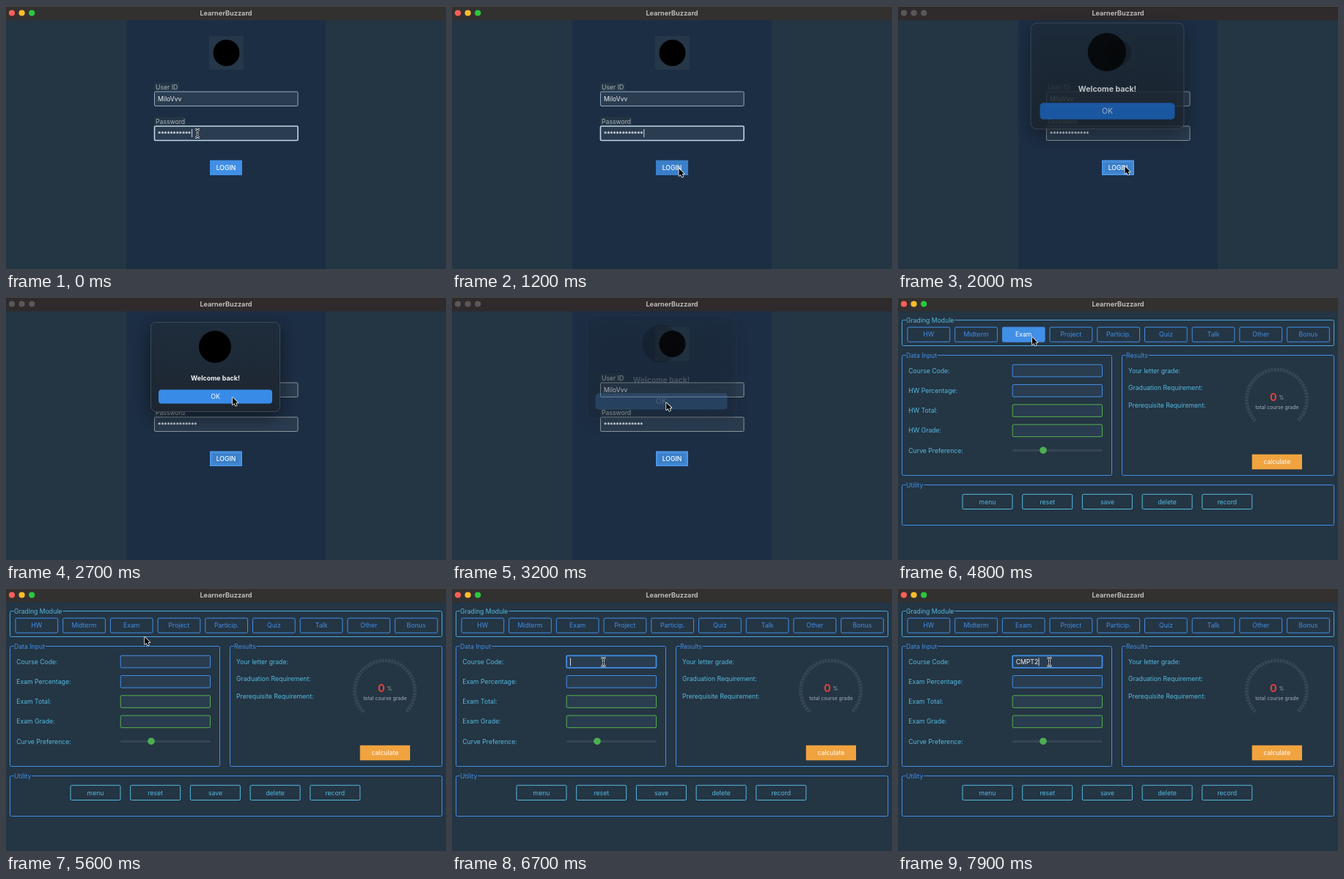
Write an HTML page with a canvas that moves like this. It is 600 px wide and 359 px high and loops after 8000 ms.

```html
<!DOCTYPE html>
<html lang="en">
<head>
<meta charset="utf-8">
<title>LearnerBuzzard</title>
<style>
html, body { margin: 0; overflow: hidden; background: #243544; }
canvas { display: block; width: 600px; height: 359px; }
</style>
</head>
<body>
<canvas width="600" height="359"></canvas>
<script>
const ctx = document.querySelector('canvas').getContext('2d');
const LOOP = 8000;
const BG = '#243544', PANEL = '#1c2e44', ENTRY = '#2a3c50';
const BLUE = '#418fe6', CYAN = '#55bade', GREEN = '#56b04c', ORANGE = '#f0a33e', RED = '#dc413c';

const POPUP_IN = 1850, POPUP_OUT = 3000, MAIN_AT = 3600;
const EXAM_CLICK = 5100, FOCUS_CODE = 6400;

// Pointer keyframes: time, x, y
const PATH = [
  [0, 261, 174], [350, 261, 174], [850, 306, 227], [1200, 309.5, 222], [1500, 309.5, 219],
  [2200, 309.5, 219], [2600, 309, 137], [3050, 309, 137], [3600, 218, 176], [3800, 197, 184],
  [4050, 197, 184], [4600, 181, 52], [4800, 183, 55], [5300, 183, 55], [6200, 206.5, 101]
];
const KEYS = [[7200, 'C'], [7300, 'M'], [7400, 'P'], [7600, 'T'], [7900, '2']];

const clamp = v => Math.max(0, Math.min(1, v));

function pointerAt(t) {
  const i = PATH.findIndex(k => k[0] > t);
  if (i < 0) return PATH[PATH.length - 1].slice(1);
  const [a, b] = [PATH[i - 1], PATH[i]];
  const p = (t - a[0]) / (b[0] - a[0]), e = p * p * (3 - 2 * p);
  return [a[1] + (b[1] - a[1]) * e, a[2] + (b[2] - a[2]) * e];
}

function text(s, x, y, color, { size = 8.67, weight = 400, align = 'left' } = {}) {
  ctx.font = `${weight} ${size}px Inter, sans-serif`;
  ctx.textAlign = align;
  ctx.fillStyle = color;
  ctx.fillText(s, x, y);
}

function box(x, y, w, h, fill, stroke, radius = 0, line = 1) {
  ctx.beginPath();
  ctx.roundRect(x, y, w, h, radius);
  if (fill) { ctx.fillStyle = fill; ctx.fill(); }
  if (stroke) { ctx.strokeStyle = stroke; ctx.lineWidth = line; ctx.stroke(); }
}

function disc(x, y, r, fill) {
  ctx.beginPath();
  ctx.arc(x, y, r, 0, 2 * Math.PI);
  ctx.fillStyle = fill;
  ctx.fill();
}

const inside = ([px, py], x, y, w, h) => px >= x && px <= x + w && py >= y && py <= y + h;

function caret(x, y) {
  ctx.fillStyle = '#d5dce2';
  ctx.fillRect(x, y - 5.5, 1, 11);
}

function titleBar(active) {
  box(0, 0, 600, 19.5, active ? '#333030' : '#2f2b2d');
  box(0, 0, 600, 1, '#4a4747');
  ['#ff5f57', '#febc2e', '#28c840'].forEach((c, i) => disc(8 + i * 13.6, 9.5, 4.1, active ? c : '#5a5758'));
  text('LearnerBuzzard', 300, 12.6, '#bdbab9', { size: 9.1, weight: 700, align: 'center' });
}

function loginPage(t, pointer) {
  const focused = t >= 1400;
  const grey = '#a9b5be';
  box(164, 19.5, 272, 340, PANEL);
  box(277, 41, 47, 46, '#253748');
  disc(300.5, 64, 18, '#000');

  box(202, 104.5, 34, 12, BG);
  text('User ID', 204, 114.2, grey);
  box(202.5, 117, 195.5, 19.5, ENTRY, focused ? '#8b969d' : '#8faabf', 1.5);
  text('MiloVvv', 207, 130.2, '#e8ecef');

  box(202, 151.5, 43, 12, BG);
  text('Password', 204, 161.2, grey);
  box(202.5, 164, 195.5, 19.5, ENTRY, focused ? '#8b969d' : '#bdd7e4', 1.5, focused ? 1 : 1.6);
  const stars = 11 + (t >= 150) + (t >= 300);
  for (let i = 0; i < stars; i++)
    text('*', 209.2 + i * 4.1, 178.3, '#e8ecef', { weight: 600, align: 'center' });
  if (!focused) caret(208 + stars * 4.1, 173.5);

  const hover = inside(pointer, 278, 210, 44, 21);
  box(278, 210.5, 44, 20.5, focused || hover ? '#3a7fc9' : BLUE);
  if (focused) {
    box(279, 211.5, 42, 18.5, null, '#4f9cf0', 0, 1.6);
    ctx.setLineDash([1, 1]);
    box(281.5, 213.5, 37, 14, null, '#6fa9e4', 0, 0.6);
    ctx.setLineDash([]);
  }
  text('LOGIN', 300, 224, '#fff', { weight: 500, align: 'center' });
}

function popup(t) {
  const enter = clamp((t - POPUP_IN) / 400), leave = clamp((t - POPUP_OUT) / 250);
  const alpha = clamp(enter * 2) * (1 - leave);
  if (!alpha) return;
  const scale = 1 + 0.3 * (1 - enter) + 0.2 * leave;
  ctx.save();
  ctx.globalAlpha = alpha;
  ctx.translate(285.5, 95.5);
  ctx.scale(scale, scale);
  ctx.shadowColor = 'rgba(0,0,0,.5)';
  ctx.shadowBlur = 26;
  ctx.shadowOffsetY = 8;
  const fill = ctx.createLinearGradient(0, -61, 0, 61);
  fill.addColorStop(0, '#1e2d3c');
  fill.addColorStop(1, '#1d2630');
  box(-88, -61, 176, 122, fill, null, 7);
  ctx.shadowColor = 'transparent';
  box(-88, -61, 176, 122, null, '#47525d', 7, 0.8);
  disc(-0.5, -27.5, 22, '#000');
  text('Welcome back!', 0, 18.2, '#f2f4f5', { size: 8.9, weight: 700, align: 'center' });
  const lit = t >= 2350;
  box(-77.5, 31, 155, 19, lit ? (t >= 2850 ? '#5aa5f5' : '#388ce8') : '#1a68c4', null, 4);
  text('OK', 0, 43.7, lit ? '#fff' : '#c9d3de', { size: 8.9, align: 'center' });
  ctx.restore();
}

function group(label, x, y, w, h, color, ink = color) {
  box(x, y, w, h, null, color, 2);
  ctx.font = '400 8.67px Inter, sans-serif';
  box(x + 5, y - 3, ctx.measureText(label).width + 1.5, 6, BG);
  text(label, x + 5.5, y + 3.2, ink);
}

function button(label, x, y, w, h, color, pointer) {
  const hover = pointer && inside(pointer, x, y, w, h);
  box(x, y, w, h, hover ? color : null, color, 1.5);
  text(label, x + w / 2, y + h / 2 + 3.2, hover ? '#fff' : color, { align: 'center' });
}

function gauge() {
  ctx.beginPath();
  ctx.arc(516.5, 140, 41, 0.75 * Math.PI, 2.25 * Math.PI);
  ctx.setLineDash([3.1, 1.1]);
  ctx.strokeStyle = '#364656';
  ctx.lineWidth = 5;
  ctx.stroke();
  ctx.setLineDash([]);
  text('0', 512, 141.6, RED, { size: 14.5, weight: 700, align: 'center' });
  text('%', 519.5, 140, '#a5afb8', { size: 6.9 });
  text('total course grade', 516.8, 152.8, '#a5afb8', { size: 6.9, align: 'center' });
}

function mainPage(t, pointer) {
  group('Grading Module', 5.5, 31.5, 589, 35, '#4aa8dc', CYAN);
  ['HW', 'Midterm', 'Exam', 'Project', 'Particip.', 'Quiz', 'Talk', 'Other', 'Bonus'].forEach((s, i) =>
    button(s, 13 + i * 64.7, 41.2, 57.7, 20, BLUE, pointer));

  group('Data Input', 5.5, 79.5, 286, 164, BLUE);
  const unit = t >= EXAM_CLICK ? 'Exam' : 'HW';
  const focused = t >= FOCUS_CODE;
  ['Course Code:', unit + ' Percentage:', unit + ' Total:', unit + ' Grade:', 'Curve Preference:'].forEach((s, i) => {
    const y = 100.5 + i * 27.25;
    text(s, 14.3, y + 3.1, CYAN);
    if (i < 4) box(156.2, y - 8.2, 122.3, 16.6, ENTRY, i < 2 ? BLUE : GREEN, 1.5, focused && !i ? 1.8 : 1);
  });
  if (focused) {
    const typed = KEYS.filter(k => k[0] <= t).map(k => k[1]).join('');
    text(typed, 160.7, 103.8, '#f0f3f5');
    caret(161 + ctx.measureText(typed).width, 101);
  }
  box(156, 207.7, 123, 3.2, '#364454', null, 1.6);
  disc(198, 209.2, 4.8, '#4caf50');

  group('Results', 305.5, 79.5, 289, 164, BLUE);
  ['Your letter grade:', 'Graduation Requirement:', 'Prerequisite Requirement:'].forEach((s, i) =>
    text(s, 314, 103.6 + i * 23.8, CYAN));
  gauge();
  box(482.7, 214.7, 68.3, 20.5, ORANGE);
  text('calculate', 516.8, 228.2, '#fff', { align: 'center' });

  group('Utility', 5.5, 256.5, 589, 55, BLUE);
  ['menu', 'reset', 'save', 'delete', 'record'].forEach((s, i) =>
    button(s, 88 + i * 81.7, 269.3, 68, 20.2, CYAN));
}

function drawPointer([x, y], beam) {
  ctx.save();
  ctx.translate(x, y);
  ctx.lineJoin = 'round';
  const shape = new Path2D(beam
    ? 'M-3 -5.5Q0 -5.5 0 -3V3Q0 5.5 -3 5.5M3 -5.5Q0 -5.5 0 -3M0 3Q0 5.5 3 5.5M-1.5 1H1.5'
    : 'M0 0V10L2.4 7.9L4 11.5L5.8 10.7L4.2 7.2H7.3Z');
  ctx.strokeStyle = '#fff';
  ctx.lineWidth = beam ? 2.4 : 1.5;
  ctx.stroke(shape);
  if (beam) {
    ctx.strokeStyle = '#111';
    ctx.lineWidth = 1;
    ctx.stroke(shape);
  } else {
    ctx.fillStyle = '#000';
    ctx.fill(shape);
  }
  ctx.restore();
}

function draw(now) {
  const t = now % LOOP;
  const pointer = pointerAt(t);
  box(0, 0, 600, 359, BG);
  titleBar(t < 1800 || t >= MAIN_AT);
  if (t < MAIN_AT) {
    loginPage(t, pointer);
    popup(t);
  } else {
    mainPage(t, pointer);
  }
  const beam = t < 1000 ? pointer[1] < 184 : t > 5000 && pointer[1] > 92;
  drawPointer(pointer, beam);
}

const start = performance.now();
(function frame() {
  draw(performance.now() - start);
  requestAnimationFrame(frame);
})();
</script>
</body>
</html>
```
